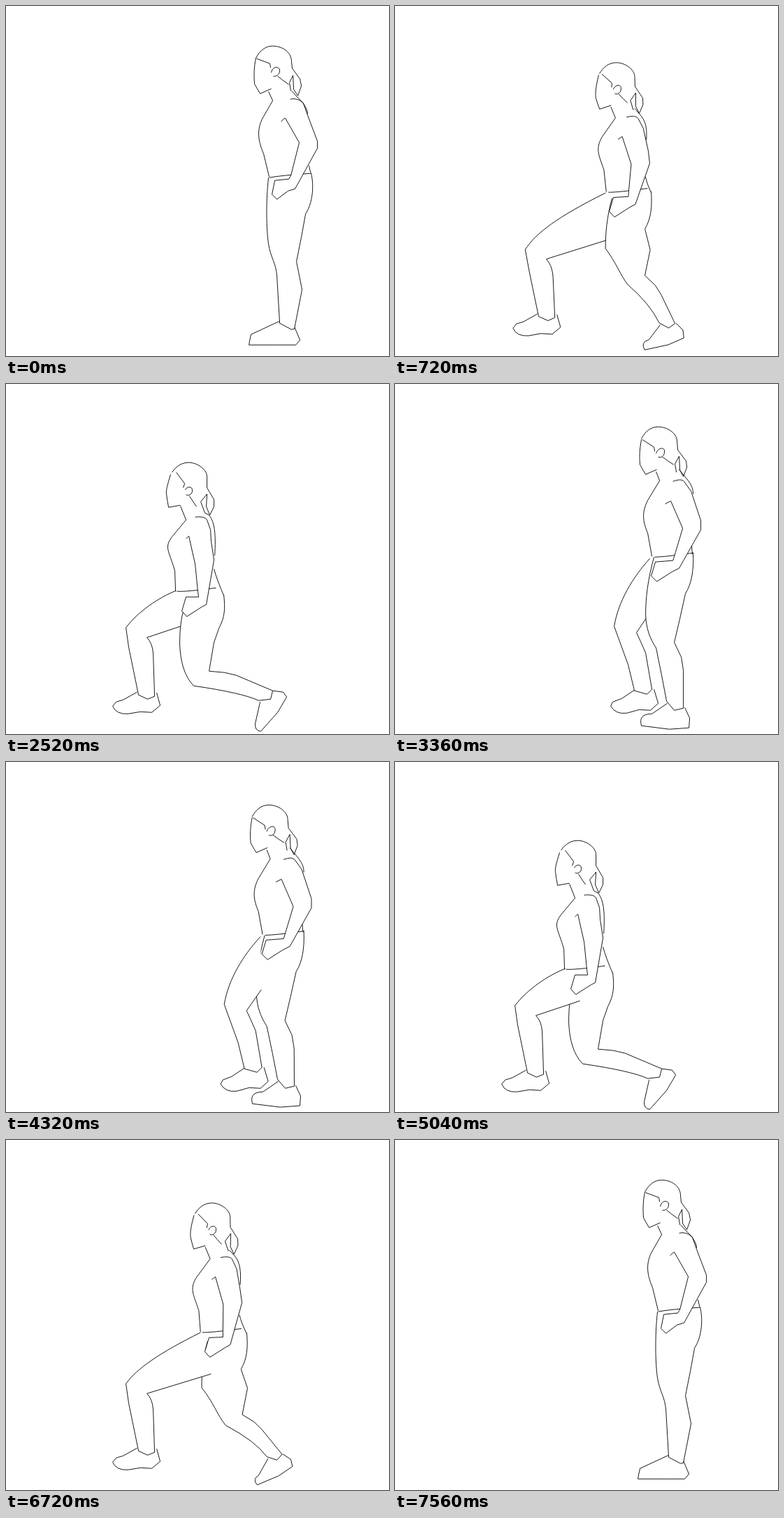
Recreate the animation shown at these times as an HTML page with a canvas. Size 548 px wide and 500 px high, loop 7.68 s.

```html
<!DOCTYPE html>
<html lang="en">
<head>
<meta charset="utf-8">
<title>Lunge</title>
<style>
  html, body { margin: 0; width: 100%; height: 100%; overflow: hidden; background: #fff; }
  canvas { display: block; }
</style>
</head>
<body>
<canvas id="stage" width="548" height="500"></canvas>
<script>
const STEP = 120, STEPS = 64;
const ctx = document.getElementById('stage').getContext('2d');

// Each part has four matching outlines: standing, stepping, lunging, kneeling.
const part = (poses, options) => ({
  template: poses[0],
  poses: poses.map(d => d.match(/\d+/g).map(Number)),
  ...options
});

const upper = [
  part([ // skull and ponytail
    'M358 74C364 63 372 57 382 57C394 57 409 64 409 80L410 89L421 104L423 114L418 128L412 119L411 99L406 109L408 121',
    'M353 78C358 68 366 61 377 61C390 61 404 70 404 82L405 94L417 110L418 119L413 132L408 123L407 103L401 114L403 126',
    'M238 126C244 117 252 112 262 112C274 112 288 122 288 132L288 148L298 165L298 175L292 187L287 175L288 157L279 168L285 184',
    'M203 179C208 168 216 162 227 161C240 162 254 168 255 182L256 191L268 207L270 218L265 231L258 221L257 202L249 217L250 219'
  ]),
  part([ // face
    'M358 74C355 88 355 100 356 111Q359 117 364 125L380 118',
    'M353 79C350 95 350 105 351 115Q354 121 359 129L375 122',
    'M236 129C231 145 229 153 230 157Q231 166 233 176L250 173',
    'M206 178C201 195 199 203 200 208Q202 222 206 223L220 221'
  ]),
  part([ // hairline
    'M359 75L378 82L379 88',
    'M354 79L371 90L372 96',
    'M244 126L256 142L254 148',
    'M211 173L224 188L223 193'
  ]),
  part([ // ear
    'M380 95C381 86 392 85 392 92C392 98 387 101 383 100',
    'M374 99C376 91 386 89 386 96C386 103 381 106 377 104',
    'M257 151C259 146 267 145 267 152C267 158 261 160 258 158',
    'M225 197C227 191 237 190 237 197C237 203 231 205 227 204'
  ]),
  part([ // nape
    'M389 100Q395 105 405 112',
    'M383 104Q391 110 399 115',
    'M263 160Q268 168 273 175',
    'M232 206Q238 215 249 217'
  ]),
  part([ // throat
    'M376 122L382 135',
    'M374 125L379 138',
    'M250 174L258 194',
    'M220 222L228 239'
  ]),
  part([ // chest
    'M382 135L367 161C360 176 360 190 369 211L377 244',
    'M379 138L362 166C353 184 355 196 362 213L368 246',
    'M258 194L238 218C226 234 234 238 242 267L243 296',
    'M228 240L212 270C205 283 210 286 223 312L231 342'
  ]),
  part([ // waistband
    'M377 245Q392 242 436 239',
    'M372 247Q385 247 428 241',
    'M245 296Q256 297 301 291',
    'M228 337Q262 352 286 341'
  ]),
  part([ // lower back
    'M434 228Q435 234 437 240',
    'M425 231Q425 237 426 243',
    'M298 264Q302 279 312 302',
    'M276 294Q281 316 293 347'
  ]),
  part([ // arm
    'M407 133C414 131 422 134 426 139L432 156L446 193L446 203L414 261L404 264L388 276L381 269L385 249L405 247L408 242L420 195L400 160Q398 160 394 165',
    'M398 139C406 136 411 136 414 139L424 153L438 195L438 208L407 263L397 268L375 282L367 274L373 254L398 252L400 246L412 206L395 167Q391 169 387 171',
    'M271 190C279 189 286 190 288 194L293 208L294 225L298 251L287 315L281 318L259 332L252 324L258 304L276 304L275 297L271 257L262 217Q261 218 258 221',
    'M240 237C248 236 254 236 256 239L263 255L264 270L268 300L263 363L259 366L241 378L236 371L239 350L250 351L249 346L243 310L232 264Q231 265 228 269'
  ], { fill: true }),
  part([ // upper back
    'M409 121L425 138C430 145 432 150 432 154',
    'M407 122L420 138C425 145 427 150 427 157',
    'M285 184L291 187C299 197 301 215 299 245',
    'M249 218L267 234C278 248 278 265 276 294'
  ])
];

// "hip" is how many numbers at each end of the outline travel with the body.
const backLeg = [
  part([
    'M392 450L351 469Q349 477 348 484L390 484L415 484L421 477L413 458',
    'M390 456L368 471Q348 471 353 488L393 493L421 491L422 477L415 462',
    'M364 454L357 485Q356 495 365 496L389 469L402 447L397 440L382 438',
    'M352 454L360 486Q361 494 372 494L381 460L384 434L372 431L362 436'
  ], { fill: true, limb: 'trail', hip: 0 }),
  part([
    'M376 245C372 280 373 320 376 340C380 362 386 365 388 385Q390 419 392 453L409 462L413 461L424 405L420 385L416 365L423 330L429 297C440 280 441 255 437 239',
    'M371 247C362 280 359 305 359 330C360 350 365 363 374 377Q382 415 389 453L400 466L413 463L413 409L410 390L400 369L408 335L416 299C425 285 428 265 427 242',
    'M256 318C250 335 249 355 249 372C250 395 255 417 269 431Q338 441 362 452L379 450L382 438L330 416L313 412L291 410L298 369L305 349C314 332 314 320 312 301',
    'M240 360C238 375 237 405 237 430C237 455 240 468 257 468Q290 468 351 454L363 447L363 436L336 434L309 433L276 440L286 396L290 388C297 375 295 358 293 346'
  ], { fill: true, limb: 'trail', hip: 8 })
];

const frontLeg = [
  part([
    'M392 452L370 463L358 469L354 476Q352 482 370 482L390 482L413 482L418 476L412 460',
    'M343 437L325 449L312 454L309 460Q316 472 332 470L350 465L366 466L377 456L371 436',
    'M188 440L168 451L158 454L153 460Q158 472 175 471L193 468L209 469L221 459L216 441',
    'M186 440L168 450L156 453L151 459Q158 471 173 470L191 467L208 468L220 458L214 441'
  ], { fill: true, limb: 'lead', hip: 0 }),
  part([
    'M380 247C376 280 376 320 380 340L391 385L395 452L409 460L411 455L419 405Q411 385 411 365L422 297',
    'M365 249C340 277 320 310 314 346L334 401L343 438L361 443L368 436L359 384Q353 370 346 355L366 325',
    'M244 295C220 304 188 326 172 348L176 376L190 444L203 450L213 446L211 385Q210 370 202 362L265 341',
    'M228 327C205 327 158 340 158 354L163 370L190 442L204 447L212 444L205 400Q202 380 192 371L246 379'
  ], { fill: true, limb: 'lead', hip: 2 })
];

// Progress from stepping to lunging, separately for x and y.
const sink = v => v ** 1.7;
const glide = v => v * v * (2.4 - 1.4 * v);
const swing = v => { v = Math.min(1, v * 1.4); return v * v * (3 - 2 * v); };
const easing = { body: [glide, sink], trail: [sink, sink], lead: [swing, swing] };

// Returns the index of the earlier pose and the progress to the next one.
function blend(u, ease) {
  if (u <= 2) return [0, u / 2];
  if (u <= 9) return [1, ease((u - 2) / 7)];
  return [2, 1.125 * (1 - (1 - (u - 9) / 6) ** 2)];
}

function draw({ template, poses, fill, limb = 'body', hip = 0 }, u) {
  const count = poses[0].length;
  let i = 0;
  const path = new Path2D(template.replace(/\d+/g, () => {
    const withBody = i < hip || i >= count - hip;
    const [k, s] = blend(u, easing[withBody ? 'body' : limb][i % 2]);
    const value = poses[k][i] + (poses[k + 1][i] - poses[k][i]) * s;
    i++;
    return value.toFixed(2);
  }));
  if (fill) ctx.fill(path);
  ctx.stroke(path);
}

// Two lunges of 30 steps, with a short rest and a quicker start to the second.
function lungePhase(step) {
  if (step <= 30) return step;
  if (step <= 34) return 0;
  return step < 42 ? (step - 34) * 8 / 7 : step - 33;
}

function render(time) {
  const step = Math.floor(time / STEP) % STEPS;
  const phase = lungePhase(step);
  const u = Math.min(phase, 30 - phase);
  const frontIsNear = step > 34 && u > 0;
  const legs = frontIsNear ? [...backLeg, ...frontLeg] : [...frontLeg, ...backLeg];

  ctx.setTransform(1, 0, 0, 1, 0, 0);
  ctx.fillStyle = '#fff';
  ctx.fillRect(0, 0, 548, 500);
  ctx.translate(-0.4, 0.2);
  ctx.strokeStyle = '#000';
  ctx.lineWidth = 0.9;
  [...legs, ...upper].forEach(p => draw(p, u));
}

const start = performance.now();
(function tick() {
  render(performance.now() - start);
  requestAnimationFrame(tick);
})();
</script>
</body>
</html>
```
